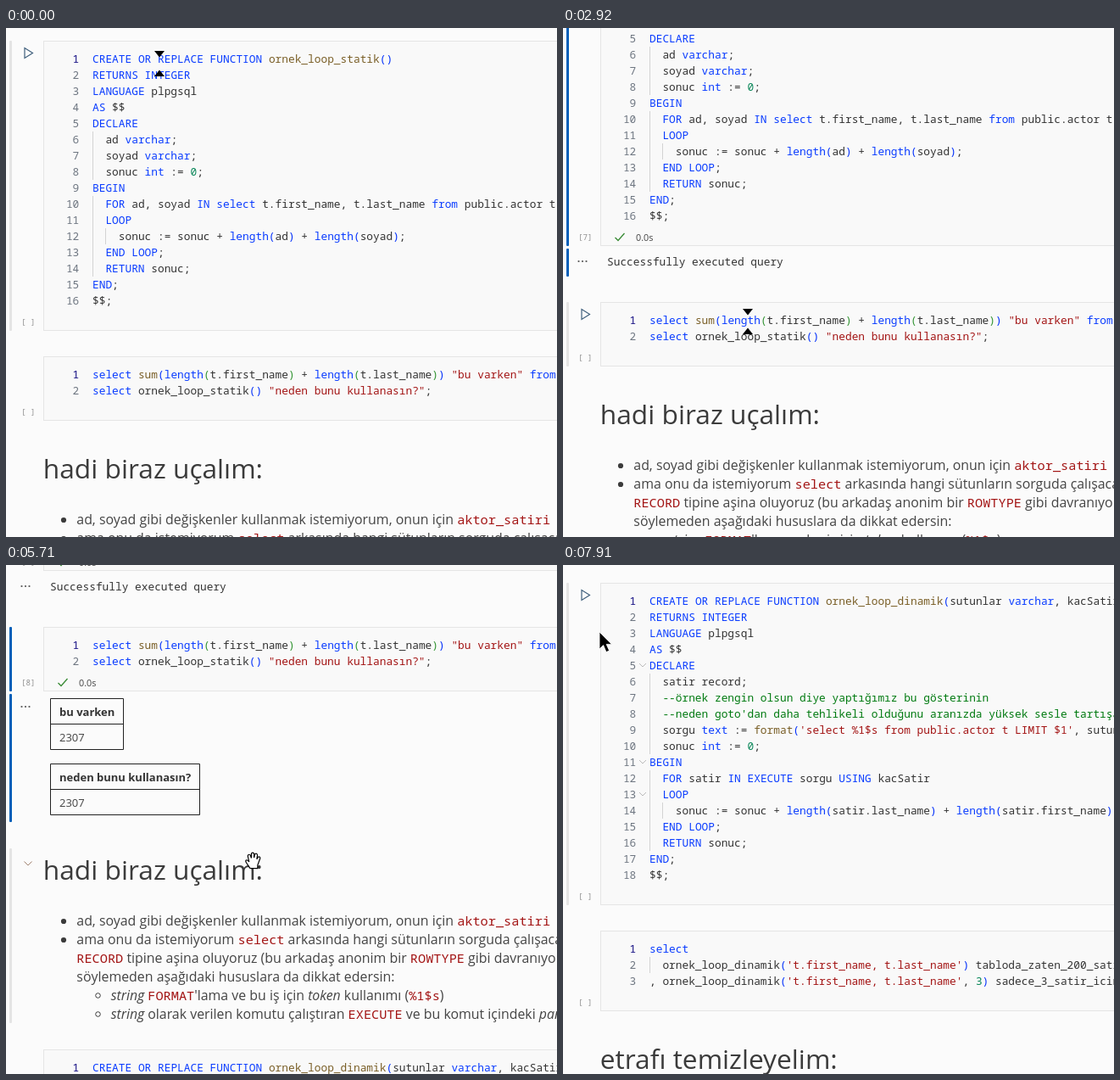
An HTML page that plays this animation: 650x600 px, repeating every 8 s.

```html
<!DOCTYPE html>
<html lang="tr">
<head>
<meta charset="utf-8">
<title>Notebook</title>
<style>
html, body { margin: 0; width: 650px; height: 600px; overflow: hidden; background: #fbfbfb; }
svg { display: block; }
text { white-space: pre; fill: #444; font: 15.9px "Open Sans", "Noto Sans", sans-serif; }
.code { font: 12.83px "Noto Sans Mono", "DejaVu Sans Mono", monospace; fill: #333; }
.num { fill: #6e7681; text-anchor: end; }
.num.first { fill: #171184; }
.count { font-size: 9.17px; fill: #8f8f8f; }
.kw { fill: #0a3cff; }
.fn { fill: #795e26; }
.str { fill: #a31515; }
.lit { fill: #098658; }
.com { fill: #007a10; }
.p1 { fill: #0431fa; }
.p2 { fill: #319331; }
.mono { font: 15.27px "Noto Sans Mono", "DejaVu Sans Mono", monospace; fill: #a31515; }
.it { font-style: italic; }
.h1 { font-size: 31.7px; fill: #3b3b3b; }
.small { font-size: 10.8px; }
.td { font-size: 13px; }
.th { font-size: 13px; font-weight: 700; fill: #333; }
.frame { fill: #f9f9f9; stroke: #e5e5e5; }
.guide { stroke: #d3d3d3; }
.line { fill: none; stroke: #222; }
.icon { fill: none; stroke: #616161; stroke-width: 1.2; }
.bar { fill: none; }
.hover .bar { fill: #e4e4e4; }
.sel .bar { fill: #005fb8; }
.play, .press, .fold, .out, .done, .busy, .ran .idle { display: none; }
.hover .play, .over .press, .gutter .fold, .ran .out, .ran .done, .running .busy { display: inline; }
.running .check { display: none; }
.press { fill: #e4e4e4; }
#pointer > * { display: none; }
#pointer.ibeam .ibeam, #pointer.arrow .arrow, #pointer.point .point, #pointer.grab .grab { display: inline; }
</style>
</head>
<body>
<svg width="650" height="600" viewBox="0 0 650 600">
  <g id="doc"></g>
  <g id="pointer">
    <path class="ibeam" d="M-6-15H6L0-7.5zM-6 15H6L0 7.5z"/>
    <path class="arrow" stroke="#fff" stroke-width=".8" d="M0 0v20l4.6-4.4 3.4 8 3.6-1.6-3.4-7.6h6.2z"/>
    <path class="point" stroke="#fff" stroke-width=".8" d="M-3 2a2.8 2.8 0 0 1 5.6 0v8l6 1.2q3.6.8 3.4 4.4l-.8 6.4-2 3v3h-12v-3l-5.6-7.6q-2-3-3-4 1-2.8 4-1.8l4.4 2.6z"/>
    <path class="grab" transform="translate(1.2 .8) scale(1.08)" fill="#fff" stroke="#000" stroke-width="1.1" d="M-4 8l-4-6q-1.6-2.6.2-3 1.2 0 2.8 2l-1.4-6q0-2 1.4-2t1.8 2l.6 2V-7.5q.2-1.5 1.5-1.5t1.5 1.5v4l.8-3.4q.6-1.4 1.8-1 1.2.5 1 2l-.6 4 1.2-2q1-1.2 2-.4.8.8.3 2l-2.6 7v3.4z"/>
  </g>
</svg>
<script>
const LOOP = 8000, ROW = 19, CHAR = 7.7;
const $ = id => document.getElementById(id);
const text = (x, y, cls, body) => `<text x="${x}" y="${y}" class="${cls}">${body}</text>`;
const span = (cls, body) => `<tspan class="${cls}">${body}</tspan>`;
const bar = (y, h) => `<rect class="bar" x="4" y="${y}" width="3" height="${h}" rx="1"/>`;
const dots = y => [18.5, 23, 27.5].map(x => `<circle cx="${x}" cy="${y}" r="1.1" fill="#555"/>`).join("");

const KEYWORDS = new Set(("CREATE OR REPLACE FUNCTION RETURNS INTEGER LANGUAGE AS DECLARE BEGIN FOR IN LOOP END " +
  "RETURN EXECUTE USING select from varchar int text length").split(" "));
const FUNCTIONS = new Set(["sum", "format"]);

function highlight(src) {
  let depth = 0, prev = "";
  return src.replace(/--.*|'[^']*'|"[^"]*"|[\wığüşöç]+|[()]/g, tok => {
    const before = prev;
    prev = tok;
    if (tok.startsWith("--")) return span("com", tok);
    if (/^['"]/.test(tok)) return span("str", tok);
    if (tok === "(") return span("p" + ++depth, tok);
    if (tok === ")") return span("p" + depth--, tok);
    if (KEYWORDS.has(tok)) return span("kw", tok);
    if (before === "FUNCTION" || FUNCTIONS.has(tok)) return span("fn", tok);
    return /^\d+$/.test(tok) ? span("lit", tok) : tok;
  });
}

function codeLine(src, i, top) {
  const y = top + 26 + i * ROW, indent = src.search(/\S/);
  let out = text(86.3, y, "code num" + (i ? "" : " first"), i + 1);
  for (let k = 0; k < indent / 2; k++) {
    const x = 102.5 + Math.round(k * 2 * CHAR);
    out += `<path class="guide" d="M${x} ${y - 14}v${ROW}"/>`;
  }
  if (/^\s*(DECLARE|BEGIN|LOOP)$/.test(src))
    out += `<path class="fold" fill="none" stroke="#bbb" d="M90 ${y - 7}l4 4 4-4"/>`;
  return out + text(102 + indent * CHAR, y, "code", highlight(src.trim()));
}

function cell(id, top, height, src, run, output = "") {
  const y = top + height - 10;
  return `<g id="${id}">${bar(top, height + 1)}
    <rect class="frame" x="44.5" y="${top + .5}" width="700" height="${height}"/>
    <rect class="press" x="13" y="${top}" width="28" height="28" rx="4"/>
    <path class="play icon" style="stroke:#3f5f7c" d="M22 ${top + 8.5}v12l9.5-6z"/>
    ${src.split("\n").map((s, i) => codeLine(s, i, top)).join("")}
    ${text(18, y + 3.5, "code count idle", "[ ]")}
    <g class="done">${text(18, y + 3.5, "code count", `[${run}]`)}${text(86, y + 4.5, "small", "0.0s")}
      <path class="check icon" style="stroke:#388a34;stroke-width:1.3" d="M61.5 ${y + 1}l3.5 3.5 7.5-8.5"/></g>
    <path class="busy icon" d="M62 ${y + 1}a5 5 0 0 0 8 3.5m0 3v-3h-3M72 ${y - 1}a5 5 0 0 0-8-3.5m0-3v3h3"/>
    <g class="out">${output}</g></g>`;
}

const table = (y, w, head, value) =>
  `<path class="line" d="M52.5 ${y + .5}h${w}v60h-${w}zm0 30h${w}"/>` +
  text(63, y + 20.5, "th", head) + text(63, y + 50.5, "td", value);

function notes() {
  const m = s => span("mono", s), it = s => span("it", s);
  const rows = [
    "ad, soyad gibi değişkenler kullanmak istemiyorum, onun için " + m("aktor_satiri"),
    "ama onu da istemiyorum " + m("select") + " arkasında hangi sütunların sorguda çalışacağını",
    m("RECORD") + " tipine aşina oluyoruz (bu arkadaş anonim bir " + m("ROWTYPE") + " gibi davranıyor)",
    "söylemeden aşağıdaki hususlara da dikkat edersin:",
    it("string") + " " + m("FORMAT") + "'lama ve bu iş için " + it("token") + " kullanımı (" + m("%1$s") + ")",
    it("string") + " olarak verilen komutu çalıştıran " + m("EXECUTE") + " ve bu komut içindeki " + it("parametreler")
  ];
  const body = rows.map((r, i) => {
    const y = 579 + i * 22, sub = i > 3;
    const mark = sub ? `<circle cx="108.5" cy="${y + .5}" r="2.8" fill="none" stroke="#3b3b3b"/>`
      : i < 2 ? `<circle cx="68" cy="${y + 1}" r="3.1" fill="#3b3b3b"/>` : "";
    return mark + text(sub ? 123.7 : 83.3, y + 6, "", r);
  }).join("");
  return `<g id="md">${bar(494, 206)}<path class="play icon" style="stroke:#a08270;stroke-width:1" d="M21.5 509.5l4.5 4.5 4.5-4.5"/>
    ${text(43.8, 531, "h1", "hadi biraz uçalım:")}${body}</g>`;
}

const staticLoop = `CREATE OR REPLACE FUNCTION ornek_loop_statik()
RETURNS INTEGER
LANGUAGE plpgsql
AS $$
DECLARE
  ad varchar;
  soyad varchar;
  sonuc int := 0;
BEGIN
  FOR ad, soyad IN select t.first_name, t.last_name from public.actor t
  LOOP
    sonuc := sonuc + length(ad) + length(soyad);
  END LOOP;
  RETURN sonuc;
END;
$$;`;

const compare = `select sum(length(t.first_name) + length(t.last_name)) "bu varken" from public.actor t;
select ornek_loop_statik() "neden bunu kullanasın?";`;

const dynamicLoop = `CREATE OR REPLACE FUNCTION ornek_loop_dinamik(sutunlar varchar, kacSatir int)
RETURNS INTEGER
LANGUAGE plpgsql
AS $$
DECLARE
  satir record;
  --örnek zengin olsun diye yaptığımız bu gösterinin
  --neden goto'dan daha tehlikeli olduğunu aranızda yüksek sesle tartışalım
  sorgu text := format('select %1$s from public.actor t LIMIT $1', sutunlar);
  sonuc int := 0;
BEGIN
  FOR satir IN EXECUTE sorgu USING kacSatir
  LOOP
    sonuc := sonuc + length(satir.last_name) + length(satir.first_name);
  END LOOP;
  RETURN sonuc;
END;
$$;`;

const dynamicCall = `select
  ornek_loop_dinamik('t.first_name, t.last_name') tabloda_zaten_200_satir
, ornek_loop_dinamik('t.first_name, t.last_name', 3) sadece_3_satir_icin`;

$("doc").innerHTML =
  cell("c1", 15, 341, staticLoop, 7,
    bar(360, 33) + dots(375) + text(52, 380, "code", "Successfully executed query")) +
  `<g id="tail1">${cell("c2", 387, 75, compare, 8,
    bar(466, 151) + dots(481) + table(471, 86, "bu varken", 2307) +
    table(548, 176, "neden bunu kullanasın?", 2307))}
  <g id="tail2">${notes()}${cell("c3", 731, 379, dynamicLoop, 9)}${cell("c4", 1141, 94, dynamicCall, 10)}
  ${text(43.8, 1304, "h1", "etrafı temizleyelim:")}</g></g>`;

// Pointer moves: start, end, number of steps, target.
const MOVES = [
  [120, 250, 2, 227, 311], [530, 1240, 6, 30, 25], [2070, 2640, 5, 218, 346],
  [3630, 4150, 5, 28, 183], [4590, 5150, 5, 199, 288], [5290, 5430, 2, 291, 348],
  [7530, 7910, 4, 43, 79]
];
// Wheel notches: time, scroll offset.
const WHEEL = [
  [2790, 50], [2920, 100], [3060, 150], [3200, 200], [3500, 250],
  [5560, 300], [5690, 350], [5820, 400], [5990, 500], [6160, 550],
  [6310, 600], [6590, 700], [6970, 750], [7120, 800], [7250, 850], [7380, 900]
];
const RUN1 = 1790, RUN2 = 4450, SELECT = 250, BUSY = 280;

function pointerAt(t) {
  let x = 181, y = 42;
  for (const [from, to, steps, tx, ty] of MOVES) {
    if (t < from) break;
    const step = Math.floor((t - from) / (to - from) * (steps - 1) + 1e-6) + 1;
    const u = Math.min(1, step / steps), k = u * u * (3 - 2 * u);
    x += (tx - x) * k;
    y += (ty - y) * k;
  }
  return [x, y];
}

function render(t) {
  const scroll = WHEEL.reduce((s, [at, top]) => t >= at ? top : s, 0);
  const [x, y] = pointerAt(t), docY = y + scroll;
  const ran1 = t >= RUN1, ran2 = t >= RUN2;
  const d1 = ran1 ? 36 : 0, d2 = d1 + (ran2 ? 154 : 0);
  // id, top, editor bottom, end of hover area
  const zones = [
    ["c1", 15, 356, ran1 ? 393 : 356],
    ["c2", 387 + d1, 462 + d1, ran2 ? 617 + d1 : 462 + d1],
    ["md", 494 + d2, 494 + d2, 722 + d2],
    ["c3", 731 + d2, 1110 + d2, 1110 + d2],
    ["c4", 1141 + d2, 1235 + d2, 1235 + d2]
  ];
  const ran = { c1: ran1, c2: ran2 };
  const running = { c1: ran1 && t < RUN1 + BUSY, c2: ran2 && t < RUN2 + 140 };
  const selected = t >= RUN2 ? "c2" : t >= SELECT ? "c1" : "";
  let shape = "arrow";

  for (const [id, top, edge, end] of zones) {
    const hover = docY >= top && docY <= end;
    const editor = hover && docY <= edge;
    const over = editor && id !== "md" && x < 42 && docY < top + 28;
    const gutter = editor && !over && x >= 40 && x < 102;
    if (hover && id === "md") shape = "grab";
    else if (over) shape = "point";
    else if (editor && x >= 102) shape = "ibeam";
    const flags = { hover, over, gutter, sel: id === selected, ran: ran[id], running: running[id] };
    $(id).setAttribute("class", Object.keys(flags).filter(k => flags[k]).join(" "));
  }

  $("doc").setAttribute("transform", `translate(0 ${-scroll})`);
  $("tail1").setAttribute("transform", `translate(0 ${d1})`);
  $("tail2").setAttribute("transform", `translate(0 ${d2 - d1})`);
  $("pointer").setAttribute("class", shape);
  $("pointer").setAttribute("transform", `translate(${Math.round(x)} ${Math.round(y)})`);
}

const start = performance.now();
function tick() {
  render((performance.now() - start) % LOOP);
  requestAnimationFrame(tick);
}
tick();
</script>
</body>
</html>
```
